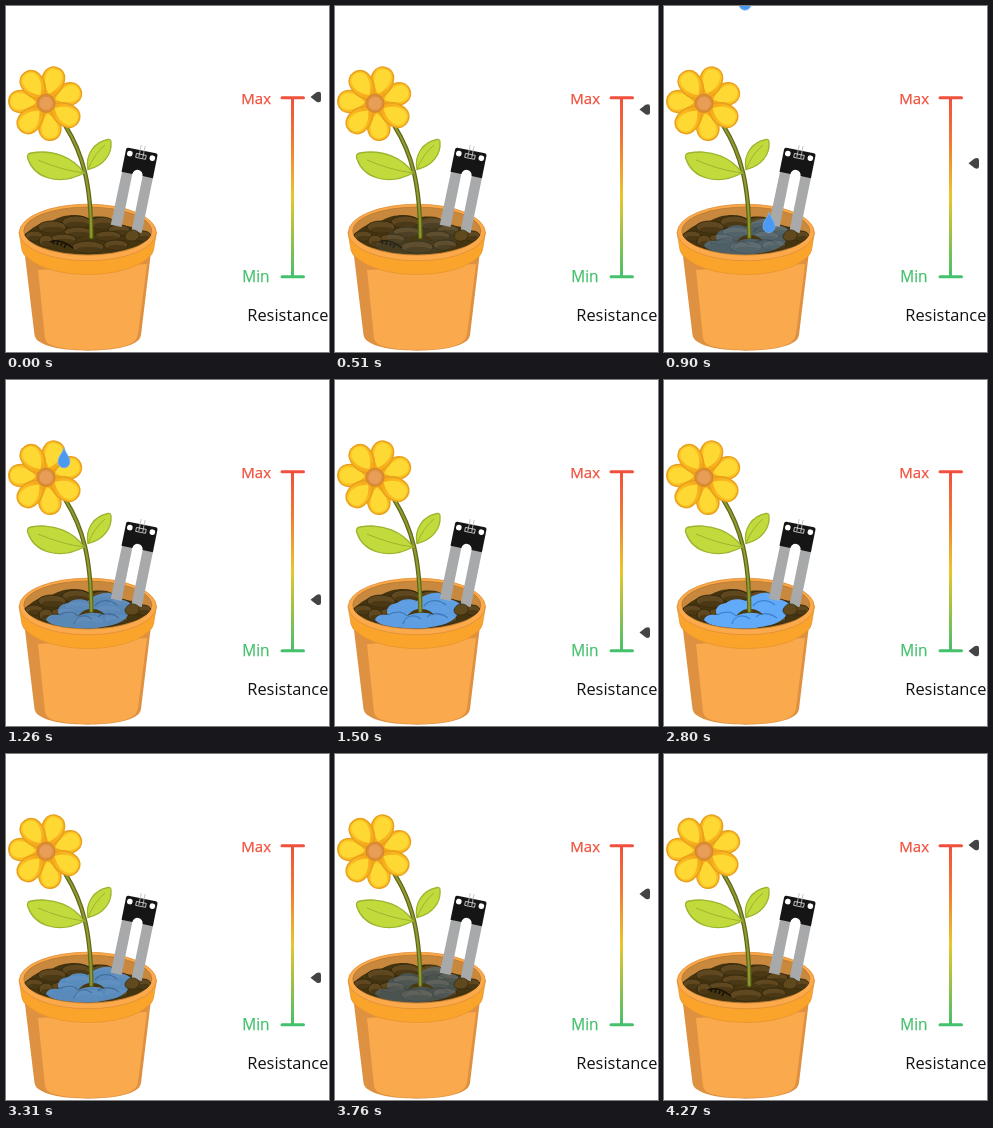
Animation of 323x346 px, one loop 5.27 s. Source, as an HTML page:

```html
<!DOCTYPE html>
<html lang="en">
<head>
<meta charset="utf-8">
<title>Soil moisture and resistance</title>
<style>
  html, body { margin: 0; width: 100%; height: 100%; overflow: hidden; background: #fff; }
  svg { display: block; width: 323px; height: 346px; }
  text { font-family: "Open Sans", "Noto Sans", sans-serif; font-weight: 500; }
</style>
</head>
<body>
<svg viewBox="0 0 323 346">
  <defs>
    <linearGradient id="scale" gradientUnits="userSpaceOnUse" x1="0" y1="92" x2="0" y2="271">
      <stop offset="0" stop-color="#f0503c"/>
      <stop offset=".25" stop-color="#f07a35"/>
      <stop offset=".55" stop-color="#e9c62c"/>
      <stop offset=".8" stop-color="#8fc04e"/>
      <stop offset="1" stop-color="#45c06c"/>
    </linearGradient>
    <linearGradient id="petal">
      <stop offset=".2" stop-color="#f7ab1b"/>
      <stop offset=".8" stop-color="#fcc626"/>
    </linearGradient>
    <clipPath id="mouth"><ellipse cx="81.8" cy="225" rx="64" ry="23.5"/></clipPath>
    <path id="drop" d="M0 0C1 5 6 9 6 14.5A6 6 0 0 1-6 14.5C-6 9-1 5 0 0Z"/>
  </defs>

  <!-- pot -->
  <path d="M19 250L28.500 329Q29.500 334 34 336C50 347.500 114 347.500 130 336Q134 334 135 329L144.500 250Z" fill="#de9140"/>
  <path d="M32 264L39 332Q40 337 45 339C62 346 112 345.500 126 337Q131 334 132 328L141 258Z" fill="#fba94d"/>
  <path d="M13 226L16 244Q17 249 22 252C46 274 118 274 142 252Q146.500 249 147.500 244L150.500 226Z" fill="#fba42b" stroke="#e3932d" stroke-width=".7"/>
  <ellipse cx="81.800" cy="226.500" rx="68.500" ry="28.300" fill="#fba94a" stroke="#dc8f36" stroke-width=".8"/>
  <ellipse cx="81.800" cy="225" rx="64" ry="24" fill="#c8893f" stroke="#b5742c" stroke-width=".7"/>

  <!-- soil -->
  <g clip-path="url(#mouth)">
    <path d="M14 232C24 224 32 216 46 215C56 208 74 207 82 212C94 208 104 212 112 219C128 220 138 224 149 232V256H14Z" fill="#44340f"/>
    <g id="clods"></g>
    <path id="twig" d="M44 236C51 233 59 236 67 242M48 235L47 238M52 235L51 239M56 236L55 240M60 238L58 242" fill="none" stroke="#171006" stroke-width="1.500"/>
    <g id="water">
      <path d="M40 240C41 235 47 234 53 235C50 229 54 224 62 223C66 219 75 218 82 221C88 215 97 212 105 213C109 220 120 218 126 225C128 231 123 232 121 237C116 243 105 246 96 247C80 251 50 250 40 240Z" fill="#61aafa"/>
      <path d="M53 235C59 231 68 231 72 236M68 244C70 236 79 233 86 239M92 237C97 232 107 233 113 238M89 226C94 219 104 219 111 225" fill="none" stroke="#3f83cd" stroke-width="1.300"/>
    </g>
    <path d="M72 236C77 230 81 229 85 229C91 229 95 230 99 235C91 232 81 232 72 236Z" fill="#493912"/>
  </g>

  <!-- plant -->
  <g fill="none" stroke-linecap="round">
    <path d="M59.500 120C77 148 85 178 85.300 231" stroke="#5e6718" stroke-width="4.400"/>
    <path d="M59.500 120C77 148 85 178 85.300 231" stroke="#929b30" stroke-width="2"/>
  </g>
  <g fill="#c3da3d" stroke="#9bb52e" stroke-width="1.300">
    <path d="M78 167C68 152 48 143 25 147Q20 148 22 153C28 171 52 181 78 167Z"/>
    <path d="M82 163.500C79 149 88 136 102 133.500Q105 133 105 136C106 148 98 160 82 163.500Z"/>
    <path d="M78 167Q55 164 32 154M82 163.500Q88 148 99 139" fill="none" stroke-width="1"/>
  </g>
  <g id="petals"></g>
  <circle cx="40" cy="97.300" r="9" fill="#dc8f38" stroke="#d08430"/>
  <circle cx="40" cy="97.300" r="6.500" fill="#e99e57"/>

  <!-- probe -->
  <g transform="translate(120.500 141.300) rotate(11.500)">
    <path d="M.5 22H11V79H0ZM21.500 22H32V81H21.500Z" fill="#a8a9aa"/>
    <path d="M2 0H30Q32 0 32 2V25H21.500A5.250 5.250 0 0 0 11 25H0V2Q0 0 2 0Z" fill="#151515"/>
    <circle cx="4.500" cy="5.500" r="2.800" fill="#fff"/>
    <circle cx="27.500" cy="5.500" r="2.800" fill="#fff"/>
    <path d="M14 4V-5M18 4V-5" stroke="#bbb" stroke-width=".8"/>
    <path d="M11 4H21V8H11ZM14 4V7M18 4V7" fill="none" stroke="#ddd" stroke-width=".8"/>
  </g>
  <path d="M119 230C121 224 127 222 132 226C135 230 132 235 126 235C122 235 119 234 119 230Z" fill="#604a1d" stroke="#372a0d" stroke-width=".8"/>

  <g id="drops"></g>

  <!-- scale -->
  <path d="M286.500 92V271" stroke="url(#scale)" stroke-width="3"/>
  <path d="M276 91.800H297.500" stroke="#f0503c" stroke-width="3" stroke-linecap="round"/>
  <path d="M276 270.700H297.500" stroke="#45c06c" stroke-width="3" stroke-linecap="round"/>
  <g stroke-width=".25">
    <text x="235.300" y="98" font-size="15" fill="#f0503c" stroke="#f0503c">Max</text>
    <text x="236.300" y="276" font-size="15.400" fill="#45c06c" stroke="#45c06c">Min</text>
    <text x="241.300" y="314.500" font-size="16.400" fill="#111">Resistance</text>
  </g>
  <path id="arrow" d="M304.500 0L310.500-4.800Q315-6.500 315-3V3Q315 6.500 310.500 4.800Z" fill="#444"/>
</svg>

<script>
const LOOP = 5270, STEP = 30;
const TOP = 91, TRAVEL = 180;
const FALL = 0.68, LANDING = 212;
const rain = [[58, 90], [105, 566], [81, 893], [58, 1130]]; // x, start time

const $ = id => document.getElementById(id);
function add(parent, tag, attrs) {
  const el = document.createElementNS("http://www.w3.org/2000/svg", tag);
  for (const key in attrs) el.setAttribute(key, attrs[key]);
  return $(parent).appendChild(el);
}

for (const [x, y, rx, ry] of [
  [70, 216, 14, 6], [96, 217, 12, 6], [46, 221, 14, 6], [113, 224, 11, 5],
  [28, 230, 9, 5], [72, 226, 14, 5], [137, 230, 8, 5], [102, 230, 13, 5],
  [57, 233, 13, 5], [40, 235, 7, 6], [82, 241, 16, 6], [110, 239, 12, 5]
]) {
  add("clods", "ellipse", { cx: x, cy: y, rx, ry, fill: "#5f4820", stroke: "#34270b", "stroke-width": .9 });
  add("clods", "ellipse", { cx: x + 1, cy: y + ry * .45, rx: rx * .8, ry: ry * .5, fill: "#4b3915" });
}

for (const i of [1, 3, 5, 0, 2, 4, 6]) {
  const transform = `translate(40 97.300) rotate(${i * 360 / 7 - 73})`;
  add("petals", "path", { d: "M5 0C10-9 20-12.500 29-10.500C40-8 40 8 29 10.500C20 12.500 10 9 5 0Z", fill: "url(#petal)", stroke: "#e9a01c", "stroke-width": 1.6, transform });
  add("petals", "path", { d: "M10 0C16-7 24-9.500 30-7.500C37-5 37 5 30 7.500C24 9.500 16 7 10 0Z", fill: "#fed934", transform });
}

const drops = rain.map(([x, start]) => ({
  x, start, el: add("drops", "use", { href: "#drop", fill: "#4a99f3", stroke: "#86bbf7", "stroke-width": .6 })
}));

const sine = (t, from, to) => {
  const u = Math.min(1, Math.max(0, (t - from) / (to - from)));
  return (1 - Math.cos(Math.PI * u)) / 2;
};

function draw(now) {
  const t = Math.floor(now % LOOP / STEP) * STEP;
  const wet = t < 1800 ? sine(t, 240, 1830) : 1 - sine(t, 2800, 4260);
  $("arrow").setAttribute("transform", `translate(0 ${TOP + TRAVEL * wet})`);
  $("water").setAttribute("opacity", wet);
  $("twig").setAttribute("opacity", Math.max(0, 1 - wet * 4));
  for (const { x, start, el } of drops) {
    const y = (t - start) * FALL - 21;
    el.setAttribute("transform", `translate(${x} ${y})`);
    el.setAttribute("visibility", y > -21 && y < LANDING ? "visible" : "hidden");
  }
}

const began = performance.now();
function tick() {
  draw(performance.now() - began);
  requestAnimationFrame(tick);
}
tick();
</script>
</body>
</html>
```
